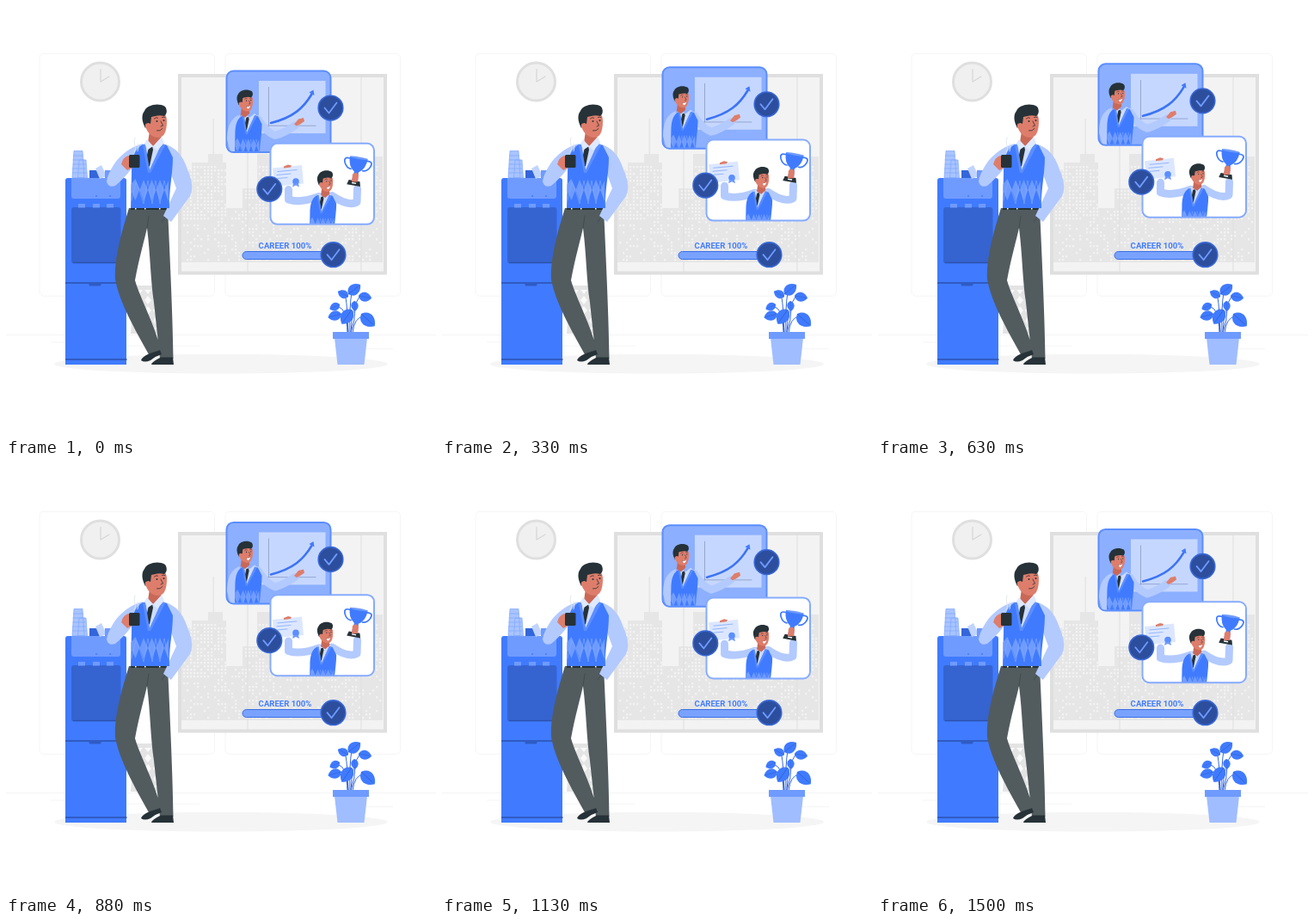
These frames come from a looping animation (500x500 px, 1540 ms). An HTML page:

```html
<!DOCTYPE html>
<html lang="en">
<head>
<meta charset="utf-8">
<style>
  html, body { margin: 0; height: 100%; overflow: hidden; background: #fff; }
  svg { display: block; width: 100%; height: 100%; }
  .blue { fill: #407bff; } .mid { fill: #6f9bff; } .shirt { fill: #b3caff; }
  .skin { fill: #de7d6b; } .dark { fill: #263238; } .navy { fill: #2c4e9d; }
  .line { fill: none; stroke-linecap: round; stroke-linejoin: round; }
  .label { font: 700 9.6px Roboto, "Open Sans", sans-serif; font-stretch: 75%; text-anchor: middle; }
</style>
</head>
<body>
<svg viewBox="0 0 500 500">
  <defs>
    <clipPath id="clip1"><rect x="257" y="77" width="120" height="92.5" rx="7"/></clipPath>
    <clipPath id="clip2"><rect x="308" y="161" width="119.500" height="92.500" rx="7"/></clipPath>
    <pattern id="mesh" width="10" height="12" patternUnits="userSpaceOnUse">
      <path d="M5 1l4 5-4 5-4-5z" fill="#fafafa"/>
    </pattern>
    <g id="head">
      <path d="M167 145h13l1 12-8 7-8-5z" fill="#c96857"/>
      <path class="skin" d="M165 124C180 118 187 124 187 134C187 147 183 153 177 153C170 153 163 147 162 138z"/>
      <path class="dark" d="M162 142C158 134 157 127 161 122C164 115 177 112 185 117C188 121 187 126 184 128C178 126 173 128 169 129L168 137L165 136z"/>
      <circle class="skin" cx="165" cy="139.500" r="3.200"/>
      <circle class="dark" cx="175.500" cy="134" r="1"/><circle class="dark" cx="183.500" cy="133" r="1"/>
      <path class="line" d="M172.500 131q2-2 4-1M181.500 129.500q2-1 3.500 0M180 134l2.500 5-2.500 1M175.500 145q4 1 6.500-2.500" stroke="#263238" stroke-width=".8"/>
    </g>
    <g id="torso">
      <path fill="#cddcff" d="M163 158l9 6 9-7 6 6-11 28-10 1-8-30z"/>
      <path class="dark" d="M166 164l4-1 1 4-4 19-4 3-1-6z"/>
      <path class="blue" d="M159 161C149 166 146 178 146 195L145 235H190C189 216 194 196 194 176L187 162L181 160L167 191L162 161z"/>
      <path class="mid" d="M187 162l-6-2-14 31-5-30-3 1 6 32h3l17-32z" opacity=".6"/>
      <path class="mid" d="M145.500 207l5-6 5 12-5 13-5-11zM155.500 214l4.500-12 5 12-5 13zM165 214l4.500-12 5 12-5 13zM174.500 214l4.500-12 5 12-5 13zM184 214l5-11v24z"/>
      <path class="line" d="M146 226l5-21 4 9 5 16 5-27 5 27 4-27 5 27 5-27 5 22" stroke="#86abff" stroke-width=".6"/>
    </g>
    <g id="check">
      <circle class="navy" r="14.300" stroke="#3867d6" stroke-width="1.600"/>
      <path class="line" d="M-7 0l5 6L7-6" stroke="#6f9bff" stroke-width="1.800"/>
    </g>
    <g id="leaf">
      <path class="blue" d="M0 0C-8-3-8-12 0-17C8-12 8-3 0 0z"/>
      <path d="M0 0V-15" stroke="#2f5fcc" stroke-width=".6"/>
    </g>
  </defs>

  <!-- room -->
  <g fill="none" stroke="#f3f3f3" stroke-width=".8">
    <rect x="39" y="55.300" width="203.500" height="282" rx="5"/>
    <rect x="255" y="55.300" width="203.500" height="282" rx="5"/>
    <path d="M0 382.500H500M417 398.600h33M397 389.300h19M52 391h43M105 391h6M131 395.200h94" stroke="#ebebeb" stroke-width=".5"/>
  </g>
  <ellipse cx="250" cy="416.200" rx="193.900" ry="11.300" fill="#f5f5f5"/>
  <circle cx="109.500" cy="88" r="22" fill="#f0f0f0" stroke="#dfdfdf" stroke-width="3"/>
  <path class="line" d="M110 73.500V88l10-6" stroke="#d6d6d6" stroke-width="1.200"/>
  <rect x="202" y="81" width="239" height="229.500" fill="#f3f3f3" stroke="#dfdfdf" stroke-width="4"/>
  <path fill="#e6e6e6" d="M204 190h12v-8h19v-10h5.500v-41h1.500v41h10v10h4v53h19v-23h17v-40h16v-7h24v30h30v-15h30v30h22v-35h24v123H204z"/>
  <path id="windows" fill="#f2f2f2"/>
  <path d="M281 81V309M413 81V309" stroke="#dfdfdf"/>

  <!-- bin -->
  <path fill="#e4e4e4" d="M149 325h43l-3 56h-44z"/>
  <path fill="url(#mesh)" d="M151 330h39l-2 46h-39z"/>

  <!-- water cooler -->
  <path class="blue" d="M69 203q0-3 3-3h65q3 0 3 3v214H69z"/>
  <path class="mid" d="M76 200h57v21q0 3-3 3H79q-3 0-3-3z"/>
  <rect x="76" y="234" width="57.500" height="65.500" rx="3" fill="#3564d1"/>
  <path d="M78 298.300h54M69 322h71.500M69 411h71.500" stroke="#2b52ad" stroke-width="1.300"/>
  <path fill="#2f5cc4" d="M96 322h15l-1 3.500H97z"/>
  <path class="mid" d="M84 230h8v4.500h-8zM101 230h8v4.500h-8zM117 230h8v4.500h-8z"/>
  <g fill="#a9c4ff" stroke="#7fa6ff" stroke-width=".7">
    <path d="M79 168.500h10l2 31H77zM85 179h8l1.500 21H83.500z"/>
    <path class="line" d="M78.500 174h11M78 179h13M78 184h14M77.500 189h15M77.500 194h16"/>
  </g>
  <path fill="#3466db" d="M97 191h13v9H97z"/>
  <path fill="#c1d4ff" d="M104 189l7-4 6 13-8 3z"/>
  <path class="mid" d="M115 191h7v9h-7z"/>
  <g fill="#407bff"><circle cx="105" cy="221" r="1"/><circle cx="121" cy="221" r="1"/></g>

  <!-- man -->
  <path fill="#525c5f" d="M143 235C131 273 126 298 127 318C132 345 150 376 166 405L180 400C173 370 156 340 150 319C155 292 161 272 164 258C168 290 168 320 172 345L179 410H194.500C194 365 191 300 188 235z"/>
  <path class="line" d="M164 258l2-14M187 238q-1 8-6 13" stroke="#3c4649" stroke-width=".7"/>
  <path class="dark" d="M167 404l12-4 2 5q-7 2-13 7-7 3-11 0 1-4 10-8zM180 408.500l14 0 1 8.500h-26q0-3 11-8.500z"/>
  <path class="dark" d="M145.500 233.500H189V237H145z"/>
  <path fill="#fff" d="M150 233.500h1.500v3H150zM161 233.500h1.500v3H161zM178 233.500h1.500v3H178z"/>
  <path class="shirt" d="M159 160C147 163 133 172 125 185Q118 196 117 204Q119 212 127 209Q137 201 146 189L158 180zM186 161C202 167 207 178 213 195Q219 211 214 221L192 251L183 244L198 212L190 190z"/>
  <use href="#torso"/><use href="#head"/>
  <path fill="#dfe9ff" d="M164 155l-3 5 4 7 6-4zM181 152l3 7-8 9-5-5z"/>
  <path class="skin" d="M134 184q2-8 8-10l7 3v10l-8 4z"/>
  <rect class="dark" x="143" y="173" width="12.500" height="15" rx="1.500"/>
  <path class="line" d="M149 170q3-4 1-8t0-9M153 169q2-4 0-9" stroke="#dfe5ef" stroke-width=".9"/>

  <!-- plant -->
  <path class="line" d="M398 380Q397 350 395 339M400 380Q399 350 402 333M401 380Q402 350 411 338M403 380Q405 362 415 361M397 380Q396 350 386 350M398 380Q398 362 388 361M401 380Q406 366 406 352" stroke="#3467dc" stroke-width="1"/>
  <g id="leaves"></g>
  <path fill="#a0bdff" d="M382 386h38l-3.500 31h-31z"/>
  <path class="mid" d="M380 379h42v8h-42z"/>

  <!-- progress -->
  <text class="label blue" x="324.500" y="281.500">CAREER 100%</text>
  <rect x="275" y="285.500" width="106" height="9" rx="4.500" fill="#79a2ff" stroke="#3a6fe8"/>
  <use href="#check" x="380.500" y="289.200"/>

  <g id="cards">
    <rect x="256.500" y="76" width="121" height="94.500" rx="8" fill="#8cafff" stroke="#5b8eff" stroke-width="2"/>
    <g clip-path="url(#clip1)">
      <rect x="294" y="87.500" width="77.500" height="61" fill="#c6d7ff"/>
      <path class="line" d="M305.500 95v45M303 139.700h57" stroke="#8a9bc5" stroke-width=".8"/>
      <path class="line" d="M308 136.500C334 130 346 119 355.500 103" stroke="#3b74f5" stroke-width="2.600"/>
      <path class="blue" d="M357.500 98l1 6.500-6-3.500z"/>
      <path class="shirt" d="M272 127C260 131 257 143 257 156L261 170H270z"/>
      <path class="line" d="M293 132Q302 147 313 151Q324 148 336 139.500" stroke="#b3caff" stroke-width="9"/>
      <use href="#torso" transform="translate(171.500 23.500) scale(.65)"/>
      <use href="#head" transform="translate(165.500 23.500) scale(.65)"/>
      <path fill="#fff" d="M279.500 117.500q3 .5 4.500-1.500-.5 4-3 4z"/>
      <path class="skin" d="M335 138l5-6 6-1.500 1 4-5 3.500-4 2z"/>
    </g>
    <use href="#check" x="377.500" y="119"/>

    <rect x="307.500" y="160.300" width="120.500" height="94" rx="8" fill="#fff" stroke="#86abff" stroke-width="2"/>
    <g clip-path="url(#clip2)">
      <path fill="#dce7ff" d="M310 189l34-3.500 2 21.500-34 3.500z"/>
      <path class="line" d="M316 193l22-2M315 197l16-1.500M316 201l11-1" stroke="#8cafff" stroke-width=".9"/>
      <circle cx="337" cy="204.500" r="3.800" fill="#5b8eff"/>
      <path class="mid" d="M334 207l-1 4 4-2 4 2-1-4z"/>
      <path class="skin" d="M323 187l5-2 4 1-1 2-8 1z"/>
      <path class="line" d="M364 222Q342 230 328.500 225.500V214" stroke="#b3caff" stroke-width="9"/>
      <path class="line" d="M379 221Q398 234 408 228.500L408.500 213" stroke="#b3caff" stroke-width="9"/>
      <use href="#torso" transform="translate(260 117.500) scale(.64)"/>
      <use href="#head" transform="translate(260.500 118.500) scale(.64)"/>
      <path fill="#fff" d="M372.500 211q3 .5 4.500-1.500-.5 4-3 4z"/>
      <g transform="rotate(10 408 190)">
        <path class="line" d="M398 179q-8-1-5 6 3 6 8 6M418 179q8-1 5 6-3 6-8 6" stroke="#407bff" stroke-width="1.700"/>
        <path class="blue" d="M397.500 176.500h21q0 12-8 17l1 10h-7l1-10q-8-5-8-17z"/>
        <ellipse class="mid" cx="408" cy="177" rx="10.500" ry="1.300"/>
        <path class="dark" d="M401 204h13l1.500 5.500h-16z"/>
        <path fill="#fff" d="M405 206h5v1.500h-5z"/>
      </g>
      <path class="skin" d="M402 205l1-9 4-2 3 3-1 8z"/>
    </g>
    <use href="#check" x="306.300" y="213.300"/>
  </g>
</svg>
<script>
  const byId = id => document.getElementById(id);

  // City windows: dense above, sparser near the ground
  let seed = 7, panes = '';
  const random = () => (seed = seed * 16807 % 2147483647) / 2147483647;
  for (let x = 206; x < 436; x += 4)
    for (let y = 186; y < 304; y += 4) {
      const density = y < 250 ? 0.72 : 0.3;
      if (random() < density && !(x > 254 && x < 276 && y < 238)) panes += `M${x} ${y}h2.300v2.300h-2.300z`;
    }
  byId('windows').setAttribute('d', panes);

  // Leaf base x, y, direction, size
  const leaves = [
    [398, 335, 52, 1.05], [410, 337, 100, .9], [413, 358, 132, 1.25], [398, 338, 297, .8],
    [388, 347, 245, .75], [390, 358, 255, .95], [402, 353, 215, 1.2], [405, 343, 175, .7]
  ];
  byId('leaves').innerHTML = leaves.map(([x, y, angle, size]) =>
    `<use href="#leaf" transform="translate(${x} ${y}) rotate(${angle}) scale(${size})"/>`).join('');

  const LOOP = 1540, LEAD = 35, LIFT = 10;
  const cards = byId('cards');
  function draw(now) {
    const phase = (now + LEAD) % LOOP / LOOP;
    const rise = LIFT * (1 - Math.abs(1 - 2 * phase));
    cards.setAttribute('transform', `translate(0 ${-rise})`);
    requestAnimationFrame(draw);
  }
  draw(performance.now());
</script>
</body>
</html>
```
